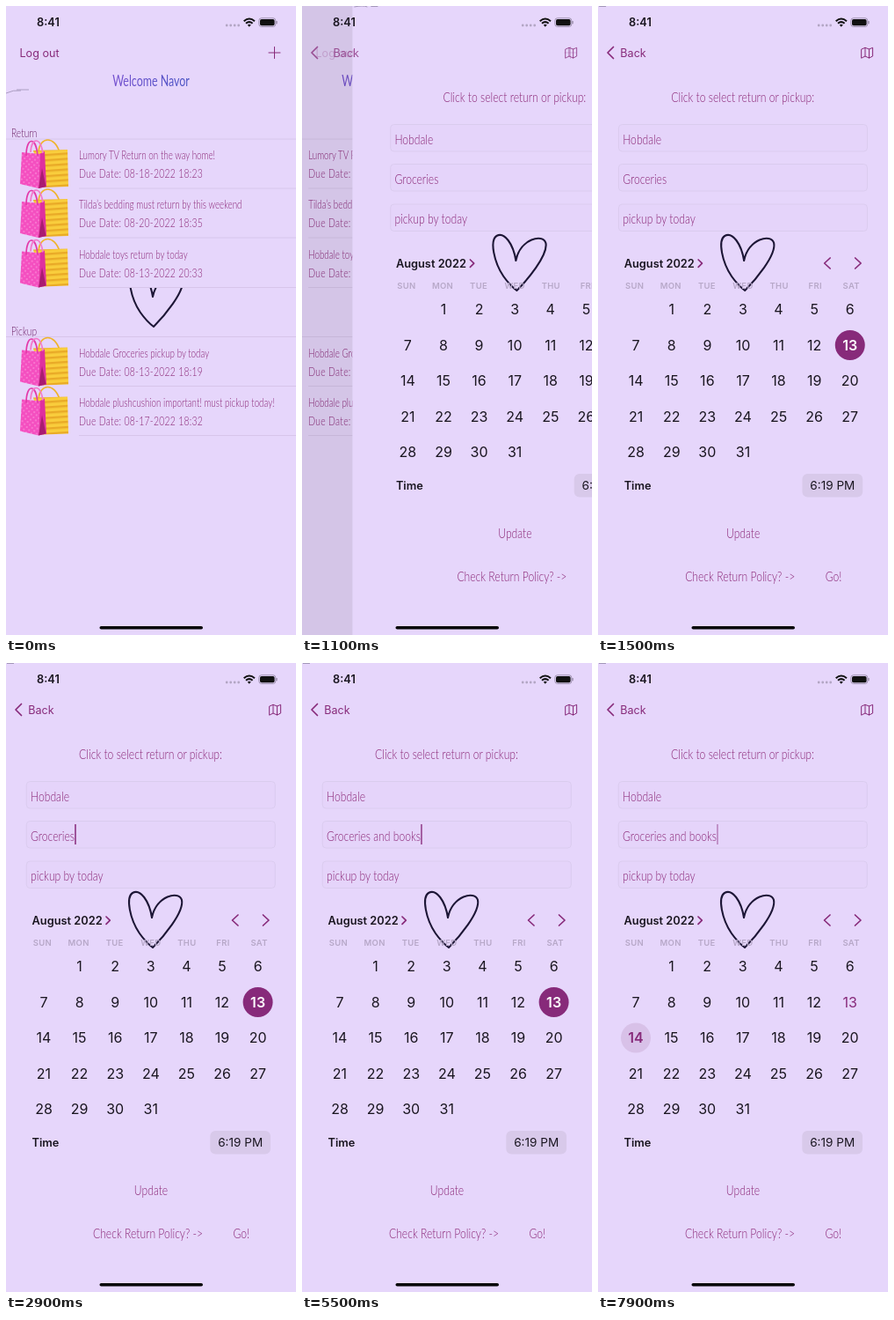
An HTML page for the animation above (8 s loop, 330 px wide and 714 px high).

```html
<!DOCTYPE html>
<html lang="en">
<head>
<meta charset="utf-8">
<title>Errand list</title>
<style>
  html, body { margin: 0; width: 100%; height: 100%; overflow: hidden; background: #e6d6fb; }
  svg { display: block; width: 330px; height: 714px; }
  text { font-family: Inter, Roboto, sans-serif; font-size: 12.6px; fill: #1a1620; white-space: pre; }
  .hand { font-family: Lato, "Open Sans", sans-serif; font-weight: 300; font-size: 16.2px; fill: #8b2777; }
  .row { font-size: 13.1px; }
  .due { font-size: 13.9px; letter-spacing: .35px; }
  .head { font-size: 13.6px; fill: #6d2266; }
  .hello { font-size: 16.6px; font-weight: 400; fill: url(#ink); }
  .bold { font-weight: 600; font-size: 12.8px; }
  .week { font-weight: 600; font-size: 9.5px; letter-spacing: .3px; fill: #b7a8c8; }
  .day { font-size: 16px; }
  .tint { fill: #872a7a; }
  .line { fill: none; stroke: #872a7a; stroke-width: 1.7; stroke-linecap: round; stroke-linejoin: round; }
  .thin { stroke-width: 1; }
  .rule { stroke: #d3c2e6; stroke-width: .8; }
  .mid { text-anchor: middle; }
</style>
</head>
<body>
<svg id="stage" viewBox="0 0 330 714"></svg>
<script>
const NARROW = 0.75; // condensed handwriting face
const text = (x, y, s, cls = '', extra = '') => `<text x="${x}" y="${y}" class="${cls}" ${extra}>${s}</text>`;
const hand = (x, y, s, cls = '', extra = '') =>
  `<text transform="translate(${x} ${y}) scale(${NARROW} 1)" class="hand ${cls}" ${extra}>${s}</text>`;
const line = (d, cls = '') => `<path class="line ${cls}" d="${d}"/>`;
const rule = (x, y) => `<path class="rule" d="M${x} ${y}H330"/>`;

const defs = `<defs>
  <linearGradient id="ink"><stop stop-color="#7550cf"/><stop offset="1" stop-color="#4a55c4"/></linearGradient>
  <pattern id="stripes" width="6" height="6" patternUnits="userSpaceOnUse" patternTransform="rotate(-4)">
    <rect width="6" height="6" fill="#f9cd3c"/><rect width="6" height="2.4" fill="#e9aa27"/></pattern>
  <pattern id="dots" width="6" height="6" patternUnits="userSpaceOnUse" patternTransform="rotate(8)">
    <rect width="6" height="6" fill="#f44fc0"/><circle cx="2" cy="2" r=".8" fill="#ffa6e2"/>
    <circle cx="5" cy="5" r=".8" fill="#ffa6e2"/></pattern>
  <clipPath id="gap"><rect y="320" width="330" height="55"/></clipPath>
  <path id="heart" fill="none" stroke="#1d1636" stroke-width="2.1" stroke-linecap="round" stroke-linejoin="round"
    d="M166 289C163 270 153 256 144 261C136 266 141 291 152 307C157 314 163 320 167 323C178 312 203 283 200 269C197 258 171 264 166 289"/>
  <g id="bags" fill="none" stroke-width="1.7">
    <path d="M21 13C23 -4 39 -5 45 14" stroke="#efb42b"/>
    <path d="M15 12L54 11L55 53L26 54Z" fill="url(#stripes)"/>
    <path d="M22 16L28 13L30 53L21 55Z" fill="#df2f9f"/>
    <path d="M25 32L29.5 53L21 55Z" fill="#a91b70"/>
    <path d="M2 14L23 16L21 55L0 50Z" fill="url(#dots)"/>
    <path d="M7 18C7 -3 18 -5 20 18" stroke="#e33aaa"/>
    <path d="M12 14C13 -3 23 -4 26 15" stroke="#f27acb"/>
  </g>
</defs>`;

const item = (y, title, due) => `<use href="#bags" x="16" y="${y + 1}"/>` +
  hand(83, y + 23, title, 'row') + hand(83, y + 44, 'Due Date: ' + due, 'due') + rule(83, y + 56);

const listPage = `<g id="list"><rect width="330" height="714" fill="#e6d6fb"/>
  <path d="M0 99Q8 95 17 96M12 95H26" fill="none" stroke="#9c90b3" stroke-width=".8"/>
  <g clip-path="url(#gap)"><use href="#heart" x="1" y="41"/></g>` +
  hand(165, 91, 'Welcome Navor', 'hello mid') +
  hand(6, 149, 'Return', 'head') + rule(0, 151) +
  item(151, 'Lumory TV Return on the way home!', '08-18-2022 18:23') +
  item(207, 'Tilda’s bedding must return by this weekend', '08-20-2022 18:35') +
  item(263.5, 'Hobdale toys return by today', '08-13-2022 20:33') +
  hand(6, 373.5, 'Pickup', 'head') + rule(0, 375.5) +
  item(375.5, 'Hobdale Groceries pickup by today', '08-13-2022 18:19') +
  item(431.5, 'Hobdale plushcushion important! must pickup today!', '08-17-2022 18:32') +
  `<rect id="dim" width="330" height="714"/></g>`;

const field = (y, s, extra) => `<rect x="23.3" y="${y}" width="283" height="30.5" rx="4" fill="#e5d4fa" stroke="#dacbee" stroke-width=".9"/>` +
  hand(28, y + 22, s, '', extra);

function calendar() {
  let out = '';
  'SUN MON TUE WED THU FRI SAT'.split(' ').forEach((d, i) => out += text(41.5 + 41.1 * i, 320.7, d, 'week mid'));
  for (let d = 1; d <= 31; d++) {
    const x = 43 + 40.6 * (d % 7), y = 344.5 + 40.5 * Math.floor(d / 7);
    if (d === 13 || d === 14) out += `<circle id="disc${d}" cx="${x}" cy="${y}" r="17"/>`;
    out += text(x, y + 5.8, d, 'day mid', `id="day${d}"`);
  }
  return out;
}

const formPage = `<g id="form"><rect x="-20" width="350" height="714" fill="#e6d6fb"/>
  <path d="M-18 1Q-8 -1 -3 1M1 .5H9" fill="none" stroke="#9c90b3" stroke-width=".9"/>
  <use href="#heart"/>` +
  hand(164.5, 109, 'Click to select return or pickup:', 'mid') +
  field(134.5, 'Hobdale') + field(179.5, 'Groceries', 'id="entry"') + field(225, 'pickup by today') +
  `<rect id="caret" y="183" width="1.5" height="23" fill="#872a7a"/>` +
  text(29.5, 296.7, 'August 2022', 'bold') +
  line('M114 288L118.3 292.2L114 296.4') + line('M264 286L257.5 292L264 298') + line('M292.5 286L299 292L292.5 298') +
  calendar() + text(29.5, 549, 'Time', 'bold') +
  `<rect x="232.3" y="531" width="68.7" height="26.5" rx="6" fill="#d8c9ea"/>` +
  text(266.7, 549.2, '6:19 PM', 'mid', 'style="font-size:13.6px"') +
  hand(165, 604, 'Update', 'mid') + hand(99, 652.5, 'Check Return Policy? -&gt;') + hand(258.5, 652.5, 'Go!') + '</g>';

const navBar = `<g id="navList">` + text(15.5, 57.7, 'Log out', 'tint') + line('M299 53H312M305.5 46.5V59.5', 'thin') + `</g>
  <g id="navForm">` + line('M17.5 46.5L11 53L17.5 59.5') + text(25.3, 57.7, 'Back', 'tint', 'id="back"') +
  line('M300 49L304 47.3L308.5 49L312.6 47.3V57L308.5 59L304 57L300 59ZM304 47.3V57M308.5 49V59', 'thin') + '</g>';

const dots = [251.2, 255.7, 260.2, 264.7].map(x => `<circle cx="${x}" cy="22" r="1.4" fill="#b3a6c4"/>`).join('');
const statusBar = text(35, 23.3, '8:41', 'bold') + dots +
  `<g fill="none" stroke="#111" stroke-width="2"><path d="M270.7 17.2Q276.8 11.8 283 17.2M273 19.8Q276.8 16.4 280.6 19.8"/></g>
  <path d="M274.8 21.5Q276.8 20 278.8 21.5L276.8 23.7Z" fill="#111"/>
  <rect x="287.8" y="13.8" width="19" height="9.6" rx="2.8" fill="none" stroke="#8d819d" stroke-width=".8"/>
  <rect x="289" y="15" width="16.6" height="7.2" rx="1.8" fill="#111"/>
  <path d="M308 17V20.2" stroke="#8d819d" stroke-width="1.2"/>
  <rect x="106.5" y="704" width="117.5" height="3.6" rx="1.8" fill="#050505"/>`;

document.getElementById('stage').innerHTML = defs + listPage + formPage + navBar + statusBar;
const $ = id => document.getElementById(id);
const set = (id, attrs) => Object.entries(attrs).forEach(([k, v]) => $(id).setAttribute(k, v));

const typed = ' and books';
const keyTimes = [3500, 3600, 3800, 4000, 4200, 4300, 4500, 4600, 4800, 5000];
const blink = { 5: 0.9, 6: 0.45, 7: 0, 8: 0, 9: 0.5 };

function caretAlpha(t) {
  if (t < 2700) return 0;
  if (t < 2900) return (t - 2600) / 300;
  return t < 5500 ? 1 : blink[t / 100 % 10] ?? 1;
}

function selectDay(moved) {
  set('disc13', { fill: moved ? 'none' : '#872a7a' });
  set('disc14', { fill: moved ? '#d8c1e8' : 'none' });
  $('day13').style.cssText = moved ? 'fill:#872a7a' : 'fill:#fff;font-weight:600';
  $('day14').style.cssText = moved ? 'fill:#872a7a;font-weight:600' : '';
}

function draw(now) {
  const t = Math.floor(now % 8000 / 100) * 100; // the screen refreshes ten times a second

  // Critically damped push from the list to the form
  const u = 0.96 + 18.2 * (t - 1000) / 1000;
  const rest = t < 1000 ? 1 : t > 1500 ? 0 : (1 + u) * Math.exp(-u);
  const p = 1 - rest;
  set('list', { transform: `translate(${-99 * p})` });
  set('dim', { opacity: 0.1 * p });
  set('form', { transform: `translate(${330 * rest})`, visibility: p ? 'visible' : 'hidden' });
  set('navList', { opacity: p > 0.9 ? 0 : 1 - p });
  set('navForm', { opacity: p > 0.9 ? 1 : p });
  set('back', { transform: `translate(${44 * rest})` });

  $('entry').textContent = 'Groceries' + typed.slice(0, keyTimes.filter(k => k <= t).length);
  set('caret', { x: 28.3 + NARROW * $('entry').getComputedTextLength(), opacity: caretAlpha(t) });
  selectDay(t >= 7700);
}

const start = performance.now();
function tick() {
  draw(performance.now() - start);
  requestAnimationFrame(tick);
}
tick();
</script>
</body>
</html>
```
